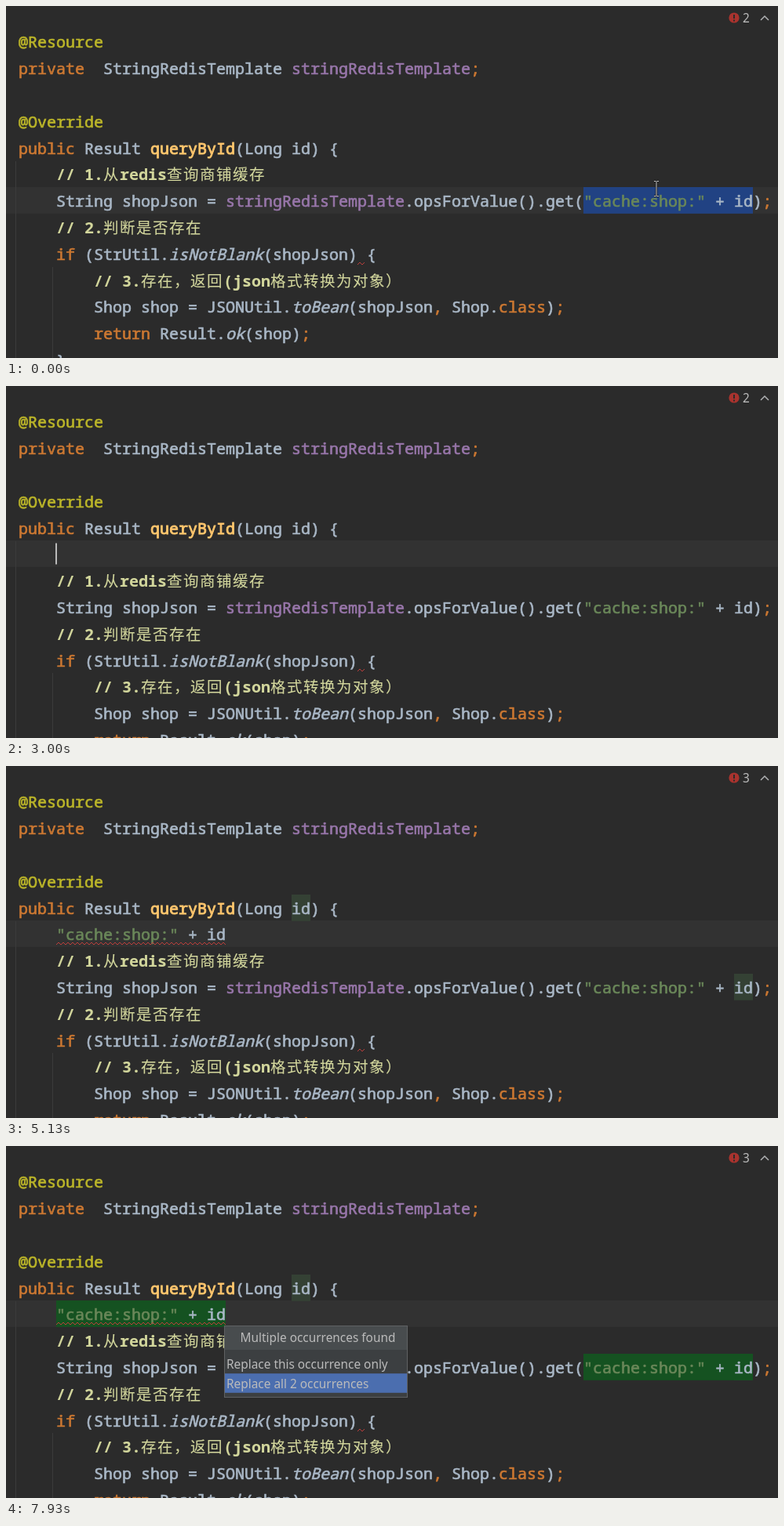
Animation, 984 px wide and 449 px high, one loop 8000 ms. Source, as an HTML page:

```html
<!DOCTYPE html>
<html lang="en">
<head>
<meta charset="utf-8">
<title>Code editor</title>
<style>
html, body { margin: 0; width: 100%; height: 100%; overflow: hidden; background: #2b2b2b; }
svg { display: block; width: 984px; height: 449px; }
text { white-space: pre; color: #a9b7c6; font: 500 20px "Noto Sans Mono", "Noto Sans CJK SC", monospace; stroke-width: .65; }
text, tspan { fill: currentColor; stroke: currentColor; }
.kw { color: #cc7832; }
.note { color: #bbb529; }
.str { color: #6a8759; }
.field { color: #9876aa; }
.fn { color: #ffc66d; stroke-width: .9; }
.brace { color: #ffef28; font-weight: bold; }
.comment { color: #d2d69c; font-weight: bold; stroke-width: .1; }
.call { font-style: italic; }
.cjk { font: 500 19.5px "Noto Sans CJK SC", sans-serif; letter-spacing: 1.5px; }
.ui { color: #bbb; font: 15.4px "Noto Sans", "Open Sans", sans-serif; stroke-width: 0; }
.item { color: #bbb; }
.bold { font-weight: bold; }
.match { color: #589df6; }
.dim { color: #8c8c8c; font-weight: 500; }
.icon { color: #3a2c2f; font-size: 14px; stroke-width: .3; }
.wave { fill: none; stroke: #bc3f3c; }
</style>
</head>
<body>
<svg id="stage" viewBox="0 0 984 449"></svg>
<script>
const LOOP = 8000, STEP = 1000 / 15;
const LEFT = 16, CHAR = 12, ROW = 33.8;
const rowTop = row => Math.round(28.3 + ROW * row);

const rect = (x, y, w, h, fill, extra = '') =>
  `<rect x="${x}" y="${y}" width="${w}" height="${h}" fill="${fill}" ${extra}/>`;
const text = (x, y, body, cls = '', anchor = 'start') =>
  `<text x="${x}" y="${y}" class="${cls}" text-anchor="${anchor}">${body}</text>`;
const span = cls => body => `<tspan class="${cls}">${body}</tspan>`;
const [kw, note, str, field, fn, call, brace, cjk, bold, match, dim] =
  ['kw', 'note', 'str', 'field', 'fn', 'call', 'brace', 'cjk', 'bold', 'match', 'dim'].map(span);
const comment = body => span('comment')(body.replace(/[\u3000-\uffef]+/g, cjk));
const semi = kw(';');

const key = str('"cache:shop:"') + ' + id';
const head = [
  note('@Resource'),
  kw('private') + '  StringRedisTemplate ' + field('stringRedisTemplate') + semi,
  '',
  note('@Override')
];
const signature = kw('public') + ' Result ' + fn('queryById') + '(Long id) ';
const body = [
  '    ' + comment('// 1.从redis查询商铺缓存'),
  '    String shopJson = ' + field('stringRedisTemplate') + `.opsForValue().get(${key})` + semi,
  '    ' + comment('// 2.判断是否存在'),
  '    ' + kw('if') + ' (StrUtil.' + call('isNotBlank') + '(shopJson) {',
  '        ' + comment('// 3.存在，返回(json格式转换为对象）'),
  '        Shop shop = JSONUtil.' + call('toBean') + '(shopJson' + kw(',') + ' Shop.' + kw('class') + ')' + semi,
  '        ' + kw('return') + ' Result.' + call('ok') + '(shop)' + semi,
  '    }'
];
const completions = [
  ['var', 'T name = expr'], ['byte', 'byte', true], ['double', 'double', true],
  ['val', 'lombok.val name = expr'], ['varl', 'lombok.var name = expr'],
  ['float', 'float', true], ['int', 'int', true], ['long', 'long', true]
];

// time, x, y of the pointer
const path = [
  [0, 829, 233], [400, 738, 258], [866, 863, 261], [1133, 939, 262],
  [1266, 939, 262], [1800, 521, 191], [2133, 521, 191], [2199, 518, 182], [LOOP, 518, 182]
];

function pointer(t) {
  const now = Math.floor((t + 5) / STEP) * STEP;
  const next = path.findIndex(p => p[0] > now);
  const [t0, x0, y0] = path[next - 1], [t1, x1, y1] = path[next];
  const k = (now - t0) / (t1 - t0);
  const x = x0 + (x1 - x0) * k, y = y0 + (y1 - y0) * k;
  const overSelection = x > 736 && x < 953 && y > 235 && y < 264;
  const beam = 'M-3-9.5h2.5M.5-9.5H3M0-9V9M-3 9.5h2.5M.5 9.5H3';
  const shape = overSelection
    ? '<path d="M0 0V21L5.5 15.5 14 14.5Z" fill="#fff" stroke="#222" stroke-width=".6"/>'
    : `<path d="${beam}" stroke="#1c1c1c" stroke-width="2.6"/><path d="${beam}" stroke="#c8c8c8"/>`;
  return `<g transform="translate(${x.toFixed(1)} ${y.toFixed(1)})">${shape}</g>`;
}

const mark = (row, column, length, fill) =>
  rect(LEFT + column * CHAR, rowTop(row), length * CHAR, ROW, fill);

function wave(x, row, width) {
  let d = `M${x} ${rowTop(row) + 31}`;
  for (let i = 1; i * 3 <= width; i++) d += `l3 ${i % 2 ? -3 : 3}`;
  return `<path class="wave" d="${d}"/>`;
}

function completionPopup(typed) {
  let out = rect(257.5, 229.5, 624, 230, '#46484a', 'stroke="#5c5e60"') + rect(258, 230, 623, 30, '#525558');
  completions.forEach(([name, type, method], i) => {
    const y = 246 + i * 29.9;
    const rest = 'Value', hit = typed.length;
    const label = method
      ? bold(name + match(rest.slice(0, hit)) + rest.slice(hit)) + dim('()')
      : name;
    if (method) out += `<circle cx="276" cy="${y - 1}" r="9" fill="#b26a74"/>` +
      text(276, y + 3.5, 'm', 'icon', 'middle');
    out += text(291, y + 7, label, 'item') + text(867, y + 7, type, 'dim', 'end');
  });
  return out;
}

function choicePopup(width, height, title, titleFill, titleY, choices, firstTop, selected) {
  let out = rect(278.5, 229.5, width, height, '#3c3f41', 'stroke="#5f6163"') +
    rect(279, 230, width - 1, 30, titleFill) +
    text(278.5 + width / 2 + (width > 200 ? 2.5 : 0), titleY, title, 'ui', 'middle') +
    rect(279, firstTop + selected * 24.6, width - 1, 24.6, '#4b6eaf');
  choices.forEach((choice, i) => out += text(281, firstTop + 18.3 + i * 24.8, choice, 'ui'));
  return out;
}

function status(count) {
  return '<circle cx="928" cy="15" r="6.6" fill="#a9332e"/>' +
    '<path d="M928 11v5M928 17.5v2" stroke="#2b2b2b" stroke-width="2"/>' +
    text(939, 21, count, 'ui') +
    '<path d="M962 18l5-5 5 5" fill="none" stroke="#afb1b3" stroke-width="1.5"/>';
}

function draw(t) {
  const split = t >= 2530, pasted = t >= 3400, clicked = t >= 2000;
  const suffix = t < 4130 || t >= 5130 ? '' : t < 4400 ? '.' : t < 4600 ? '.v' : '.va';
  const shift = split ? 1 : 0;
  const braceLit = clicked && !split;
  const idLit = t >= 3530 && t < 4130 || t >= 5130;
  const current = split ? 5 : clicked ? 4 : 6;
  const lines = [...head, signature + (braceLit ? brace('{') : '{')];
  if (split) lines.push(pasted ? '    ' + key + suffix : '');
  lines.push(...body);

  let out = rect(0, 0, 984, 449, '#2b2b2b') + rect(0, rowTop(current), 984, ROW, '#323232') +
    rect(12, 198, 1, 251, '#3b3b3b') + rect(59, rowTop(9 + shift), 1, 120, '#3b3b3b');
  if (!clicked) out += mark(6, 60, 18, '#214283');
  if (braceLit) out += mark(4, 33, 1, '#3b514d');
  if (idLit) {
    out += mark(4, 29, 2, '#344134') + mark(7, 76, 2, '#344134');
    if (t < 4130) out += mark(5, 20, 2, '#344134');
  }
  if (t >= 6070) out += mark(5, 4, 18, '#155221');
  else if (t >= 5200) out += mark(5, 20, 2, '#155221');
  if (t >= 7930) out += mark(7, 60, 18, '#155221');

  lines.forEach((line, row) => out += text(LEFT, rowTop(row) + 25, line));
  out += wave(448, 8 + shift, 11);
  if (t >= 3800) out += wave(64, 5, suffix === '.' ? 226 : 216);
  if (clicked && t < 5130) {
    const x = !split ? 424 : !pasted ? 64 : 280 + suffix.length * CHAR;
    out += rect(x - 1, rowTop(current) + 3.5, 2, 27, '#bbb');
  }
  out += status(t < 4130 ? 2 : 3);

  if (t >= 4470 && t < 5130) out += completionPopup(suffix.slice(1));
  if (t >= 7000) {
    out += choicePopup(233, 91, 'Multiple occurrences found', '#484c4e', 250,
      ['Replace this occurrence only', 'Replace all 2 occurrences'], 265.6, t < 7930 ? 0 : 1);
  } else if (t >= 5200) {
    out += choicePopup(144, 88, 'Expressions', '#3c3f41', 249,
      ['id', '"cache:shop:" + id'], 262, t < 6070 ? 0 : 1);
  }
  if (!split) out += pointer(t);
  return out;
}

const stage = document.getElementById('stage');
const start = performance.now();
let shown = '';
function tick() {
  const picture = draw((performance.now() - start) % LOOP);
  if (picture !== shown) stage.innerHTML = shown = picture;
  requestAnimationFrame(tick);
}
tick();
</script>
</body>
</html>
```
